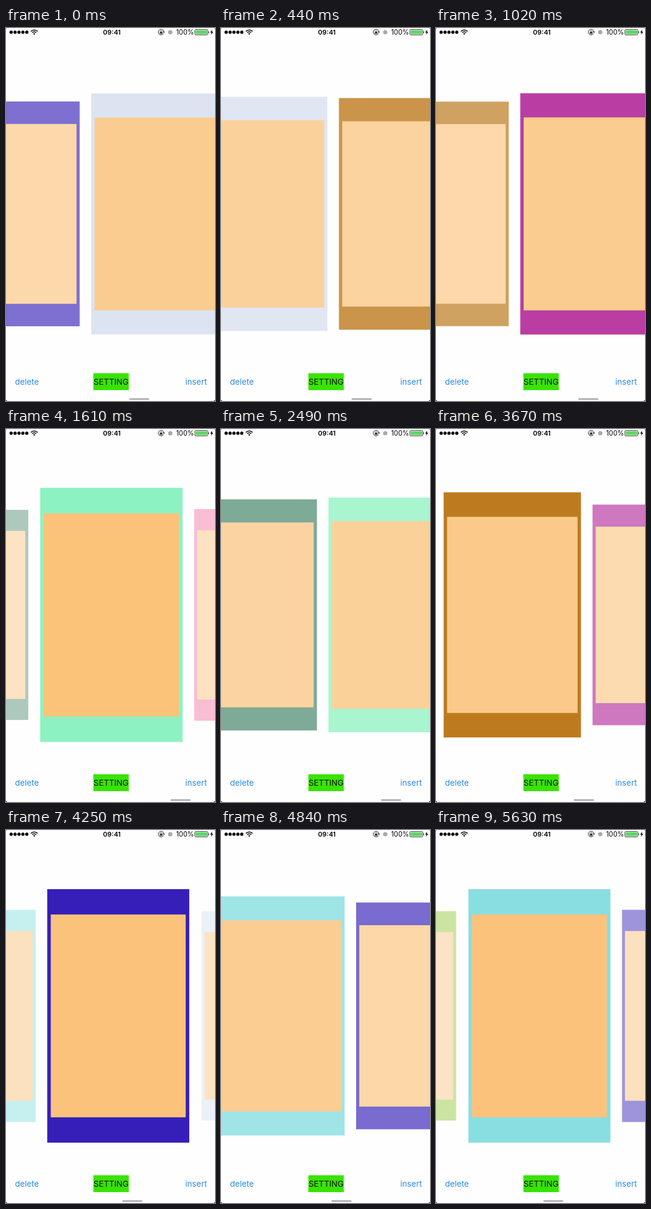
Write an HTML page that moves like this. It is 348x619 px and loops after 5730 ms.

```html
<!DOCTYPE html>
<html lang="en">
<head>
<meta charset="utf-8">
<title>Card carousel</title>
<style>
  html, body { margin: 0; width: 100%; height: 100%; overflow: hidden; background: #000; }
  svg { display: block; width: 348px; height: 619px; }
  text { font-family: Inter, Roboto, sans-serif; }
  .link { font-size: 13.6px; fill: #2b8ae6; }
  .status { font-size: 11.2px; }
  .clock { font-size: 11px; font-weight: 600; }
</style>
</head>
<body>
<svg viewBox="0 0 348 619" xmlns="http://www.w3.org/2000/svg">
  <path fill="#fefefe" d="M1 0H347L348 1V616Q348 619 345 619H3Q0 619 0 616V1Z"/>
  <g id="cards"></g>

  <g id="dots"></g>
  <g fill="none" stroke="#000" stroke-width="1.5">
    <path d="M41.4 5.6Q47 0.8 52.6 5.6M43.5 7.8Q47 4.8 50.5 7.8"/>
    <path d="M45.2 9.3Q47 7.8 48.8 9.3L47 11.2Z" fill="#000" stroke="none"/>
  </g>
  <text class="clock" x="176.3" y="11" text-anchor="middle">09:41</text>
  <g fill="none" stroke="#222">
    <path d="M262.4 8.8A4.6 4.6 0 1 1 262.8 6.2"/>
    <path d="M261.2 6H264.6L262.9 8.2Z" fill="#222" stroke="none"/>
    <path d="M256.9 6.8V5.8A1.4 1.4 0 0 1 259.7 5.8V6.8" stroke-width=".8"/>
    <rect x="256.2" y="6.5" width="4.2" height="3" fill="#222" stroke="none"/>
  </g>
  <circle cx="273.5" cy="7" r="3.6" fill="#a9a9a9"/>
  <text class="status" x="283.3" y="11">100%</text>
  <rect x="314.5" y="2.5" width="21.6" height="9" rx="1.6" fill="#fefefe" stroke="#333" stroke-width=".9"/>
  <rect x="315.7" y="3.7" width="19.2" height="6.6" rx=".7" fill="#62d468"/>
  <path d="M336.9 5.3Q338.2 5.7 338.2 7T336.9 8.7Z" fill="#333"/>
  <path d="M343.4 2.5L340 7.5H342.2L341.4 11.3L345 6.2H342.7Z"/>

  <text class="link" x="15" y="592.3">delete</text>
  <rect x="145.5" y="573" width="59" height="28" fill="#39e400"/>
  <text class="link" x="175" y="592.3" text-anchor="middle" style="fill:#101010">SETTING</text>
  <text class="link" x="334.7" y="592.3" text-anchor="end">insert</text>
  <rect id="bar" y="614.6" width="33.4" height="2.4" rx="1.2" fill="#a9a9a9"/>
</svg>
<script>
const LOOP = 5730, TICK = 146.6, LEAD = 10, LAST_TICK = 38;
const PITCH = 236.5, FIRST_X = 254.3, FOCUS = 179.5, MID_Y = 308.5;
const FULL_H = 423, ASPECT = 0.5622, FIRST_PAGE = -3;
const BAR_X = 205, BAR_STEP = 15.94;
const COLORS = ['#8bc329', '#88dee1', '#321cb7', '#d6deef', '#b56a02',
                '#ac1691', '#48876e', '#8df2c1', '#f472a3'];

// Key points of the scroll: [tick, page]
const KEYS = [[0, 0], [7, 2.006], [11, 4.333], [17, 3.856],
              [25, 1.538], [29, -0.715], [38, -1.653]];

const NS = 'http://www.w3.org/2000/svg';
const byId = id => document.getElementById(id);

function set(el, attrs) {
  for (const key in attrs) el.setAttribute(key, attrs[key]);
}

function add(parent, tag, attrs = {}) {
  const el = document.createElementNS(NS, tag);
  set(el, attrs);
  return parent.appendChild(el);
}

const secant = i => (KEYS[i + 1][1] - KEYS[i][1]) / (KEYS[i + 1][0] - KEYS[i][0]);

// Harmonic mean of the neighbouring slopes; zero where the scroll turns or ends.
function slope(i) {
  if (i === 0) return secant(0);
  if (i === KEYS.length - 1) return 0;
  const a = secant(i - 1), b = secant(i);
  return a * b > 0 ? 2 * a * b / (a + b) : 0;
}

// Smooth curve through the key points without overshoot
function pageAt(tick) {
  const i = Math.max(0, KEYS.findIndex(key => key[0] >= tick) - 1);
  const [t0, p0] = KEYS[i], [t1, p1] = KEYS[i + 1];
  const span = t1 - t0, u = (tick - t0) / span, v = 1 - u;
  return p0 * v * v * (1 + 2 * u) + p1 * u * u * (1 + 2 * v)
    + span * u * v * (slope(i) * v - slope(i + 1) * u);
}

for (let i = 0; i < 5; i++) {
  add(byId('dots'), 'circle', { cx: 8.6 + i * 6.5, cy: 7, r: 2.7 });
}

const cards = COLORS.map((fill, i) => {
  const group = add(byId('cards'), 'g');
  return {
    group,
    back: add(group, 'rect', { fill }),
    panel: add(group, 'rect', { fill: '#fbc279' }),
    page: FIRST_PAGE + i
  };
});

function placeRect(el, cx, width, height) {
  set(el, { x: cx - width / 2, y: MID_Y - height / 2, width, height });
}

// Cards shrink and fade with their distance from the focus.
function drawCard({ group, back, panel, page }, scroll) {
  const cx = FIRST_X + (page - scroll) * PITCH;
  const dist = Math.abs(cx - FOCUS);
  const shown = dist < 330;
  group.style.display = shown ? '' : 'none';
  if (!shown) return;
  const h = FULL_H - 0.309 * dist, w = h * ASPECT;
  placeRect(back, cx, w, h);
  placeRect(panel, cx, w * 0.95, h * 0.8);
  group.setAttribute('opacity', 1 - 0.00233 * dist);
}

function draw(ms) {
  const tick = Math.min(LAST_TICK, Math.floor((ms % LOOP + LEAD) / TICK));
  const scroll = pageAt(tick);
  cards.forEach(card => drawCard(card, scroll));
  byId('bar').setAttribute('x', BAR_X + scroll * BAR_STEP);
}

const start = performance.now();
function frame() {
  draw(performance.now() - start);
  requestAnimationFrame(frame);
}
frame();
</script>
</body>
</html>
```
